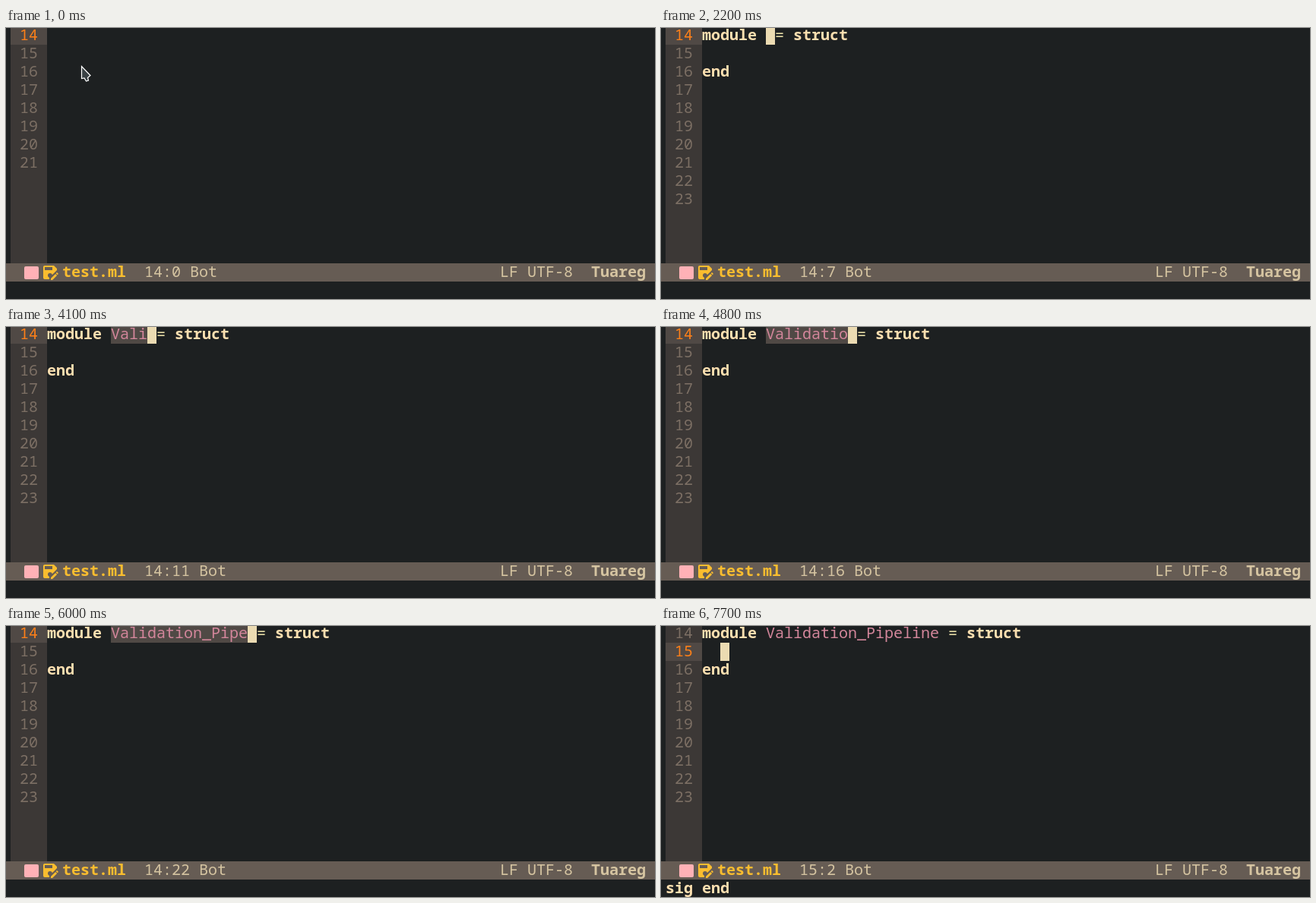
An HTML page with a canvas for the animation above (8000 ms loop, 854 by 357 pixels).

```html
<!DOCTYPE html>
<html lang="en">
<head>
<meta charset="utf-8">
<title>Editor snippet</title>
<style>
html, body { margin: 0; width: 100%; height: 100%; overflow: hidden; background: #1d2021; }
canvas { display: block; }
</style>
</head>
<body>
<canvas id="stage" width="854" height="357"></canvas>
<script>
const ctx = document.getElementById('stage').getContext('2d');
const LOOP = 8000, CELL = 12, ROW = 24, LEFT = 54;
const FAMILY = '"Noto Sans Mono", "DejaVu Sans Mono", monospace';

const COLOR = {
  bg: '#1d2021', gutter: '#3c3836', active: '#504945', bar: '#665c54',
  number: '#7c6f64', current: '#fe8019', caret: '#ebdbb2', plain: '#ebdbb2',
  keyword: '#fbdfb0', operator: '#e9dfa8', name: '#d3869b',
  status: '#d5c4a1', gold: '#fabd2f', pink: '#ffb1b6'
};

// Key press times for the trigger and for the module name
const TRIGGER = '!imod', NAME = 'Validation_Pipeline';
const triggerTimes = [1100, 1500, 1700, 1900, 2100];
const nameTimes = [3700, 3800, 3900, 4100, 4200, 4400, 4600, 4700, 4800, 5000,
  5100, 5300, 5600, 5800, 6000, 6200, 6300, 6500, 6600];
const EXPAND = 2200, HINT = 7100, TAB = 7700;
const caretOff = [[0, 400], [900, 1100], [2700, 3200], [7100, 7600]];

const saveIcon = new Path2D('M10 19L10.14 18.86C8.9 18.5 8 17.36 8 16A3 3 0 0 1 11 13' +
  'C12.36 13 13.5 13.9 13.86 15.14L20 9V7L16 3H4C2.89 3 2 3.9 2 5V19A2 2 0 0 0 4 21H10Z' +
  'M4 5H14V9H4ZM20.04 12.13L19.65 12.3L18.65 13.3L20.7 15.35L21.7 14.35V13.58L20.42 12.3Z' +
  'M18.07 13.88L12 19.94V22H14.06L20.12 15.93Z');
const pointer = new Path2D('M99.5 50.5V66.5L103 66L105.5 70L108.5 69L107.5 65.5L111 62.5Z');

const typed = (times, t) => times.filter(k => k <= t).length;

function box(x, y, w, h, color) {
  ctx.fillStyle = color;
  ctx.fillRect(x, y, w, h);
}

function text(str, x, y, color, bold) {
  ctx.font = `${bold ? 'bold ' : ''}20px ${FAMILY}`;
  ctx.fillStyle = color;
  ctx.fillText(str, x, y);
}

// Text on the editor grid
function put(str, col, row, color, bold) {
  text(str, LEFT + col * CELL, 16 + row * ROW, color, bold);
}

function drawGutter(last, active) {
  box(6, 0, 48, 310, COLOR.gutter);
  box(6, active * ROW - 2, 48, ROW, COLOR.active);
  for (let n = 14; n <= last; n++) {
    const row = n - 14;
    text(String(n), 18, 16 + row * ROW, row === active ? COLOR.current : COLOR.number);
  }
}

function drawModule(count, editing) {
  if (editing) box(LEFT + 7 * CELL, 0, count * CELL, 22, COLOR.active);
  put('module', 0, 0, COLOR.keyword, true);
  put(NAME.slice(0, count), 7, 0, COLOR.name);
  put('=', 8 + count, 0, COLOR.operator);
  put('struct', 10 + count, 0, COLOR.keyword, true);
  put('end', 0, 2, COLOR.keyword, true);
}

function drawStatus(row, col) {
  box(0, 310, 854, 24, COLOR.bar);
  ctx.fillStyle = COLOR.pink;
  ctx.beginPath();
  ctx.roundRect(24, 314, 19, 17, 2);
  ctx.fill();
  ctx.save();
  ctx.translate(47, 310);
  ctx.fillStyle = COLOR.gold;
  ctx.fill(saveIcon, 'evenodd');
  ctx.restore();
  text('test.ml', 74, 328, COLOR.gold, true);
  text(`${14 + row}:${col} Bot`, 182, 328, COLOR.status);
  text('LF UTF-8', 650, 328, COLOR.status);
  text('Tuareg', 770, 328, COLOR.status, true);
}

function drawPointer() {
  ctx.fillStyle = '#3a4245';
  ctx.fill(pointer);
  ctx.strokeStyle = '#ffffff';
  ctx.lineWidth = 1.2;
  ctx.stroke(pointer);
}

function draw(t) {
  const expanded = t >= EXPAND;
  const row = t >= TAB ? 1 : 0;
  const count = typed(expanded ? nameTimes : triggerTimes, t);
  const col = row ? 2 : expanded ? 7 + count : count;

  box(0, 0, 854, 357, COLOR.bg);
  drawGutter(expanded ? 23 : 21, row);
  if (expanded) {
    drawModule(count, !row);
  } else {
    put(TRIGGER.slice(0, count), 0, 0, COLOR.plain);
  }
  if (!caretOff.some(([a, b]) => t >= a && t < b)) {
    const top = Math.max(0, row * ROW - 2);
    box(LEFT + col * CELL, top, CELL, row * ROW + 22 - top, COLOR.caret);
  }
  drawStatus(row, col);
  if (t >= HINT) text('sig end', 6, 352, COLOR.keyword, true);
  if (t < triggerTimes[0]) drawPointer();
}

const start = performance.now();
function tick() {
  draw((performance.now() - start) % LOOP);
  requestAnimationFrame(tick);
}
tick();
</script>
</body>
</html>
```
